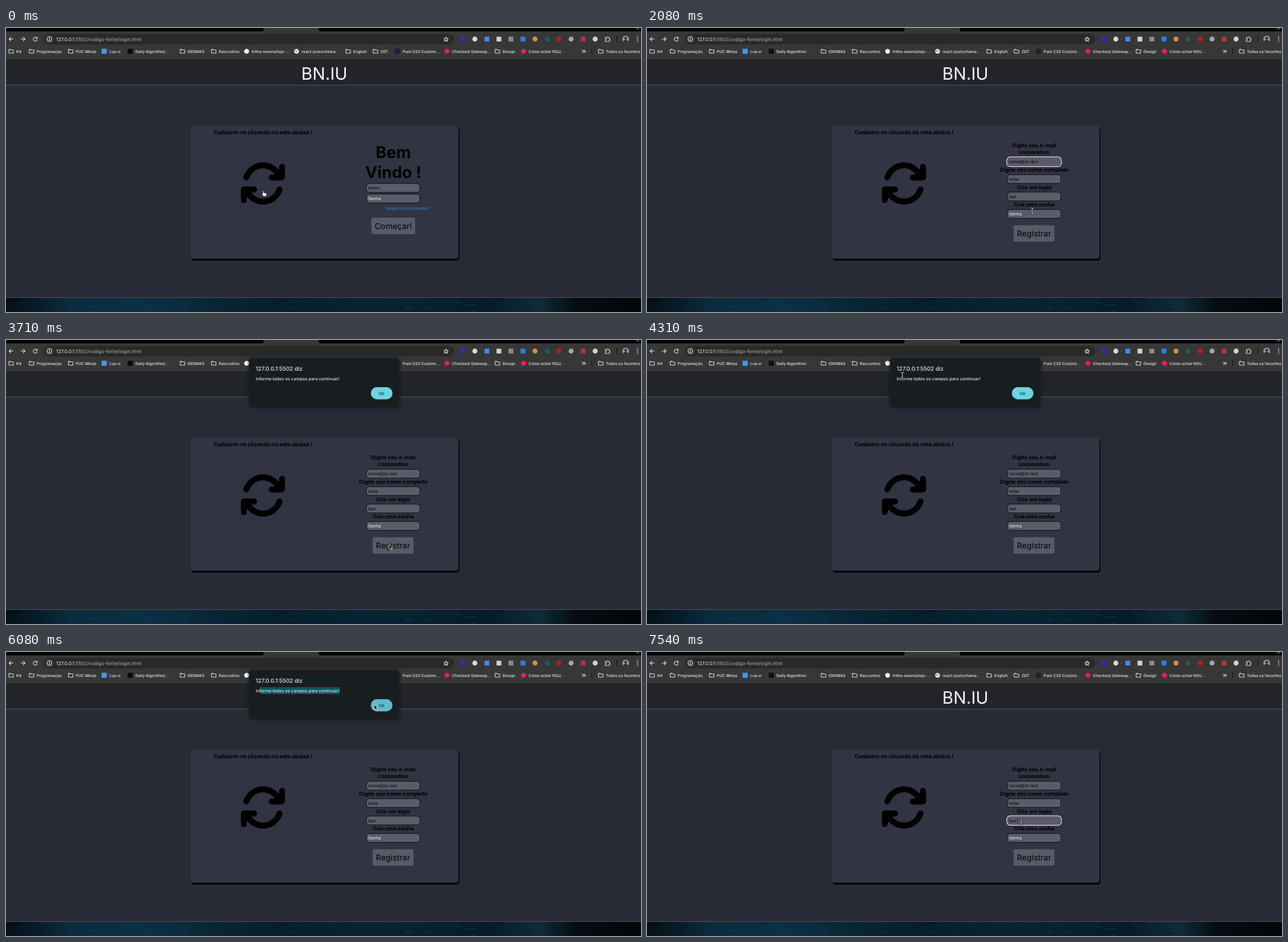
An HTML page for the animation above (7990 ms loop, 1119 by 500 pixels).

```html
<!DOCTYPE html>
<html lang="pt-BR">
<head>
<meta charset="utf-8">
<title>Login</title>
<style>
  html, body { margin: 0; width: 100%; height: 100%; overflow: hidden; background: #282a36; }
  svg { display: block; width: 100vw; height: 100vh; font-family: Inter, Roboto, sans-serif; text-rendering: geometricPrecision; }
  .bold { font-weight: 700; }
  .label { font-weight: 700; font-size: 9.5px; text-anchor: middle; }
  .mid { text-anchor: middle; }
  .line { fill: none; stroke: #e8e8e8; stroke-width: 1.1; stroke-linecap: round; stroke-linejoin: round; }
  .bookmark { font-size: 6.9px; font-weight: 500; fill: #ececec; }
  .value { font-size: 7.6px; }
</style>
</head>
<body>
<svg id="stage" viewBox="0 0 1119 500" preserveAspectRatio="none">
  <defs>
    <linearGradient id="sea">
      <stop offset="0" stop-color="#050f16"/>
      <stop offset=".1" stop-color="#0a2b3e"/>
      <stop offset=".22" stop-color="#0b2f44"/>
      <stop offset=".42" stop-color="#071e2c"/>
      <stop offset=".6" stop-color="#082434"/>
      <stop offset=".76" stop-color="#071c29"/>
      <stop offset=".84" stop-color="#102a37"/>
      <stop offset=".9" stop-color="#050c11"/>
      <stop offset="1" stop-color="#030609"/>
    </linearGradient>
    <filter id="soft" x="-10%" y="-20%" width="120%" height="150%"><feGaussianBlur stdDeviation="2.5"/></filter>
    <filter id="edge" x="-5%" y="-5%" width="110%" height="110%"><feGaussianBlur stdDeviation=".5"/></filter>
    <path id="folder" class="line" d="M-4-2.6q0-.8.8-.8h2l1 1.1h3.5q.8 0 .8.8v4q0 .8-.8.8h-6.5q-.8 0-.8-.8z"/>
    <path id="turn" d="M-181-64A192 192 0 0 1 136-136L190-80M208-176V-64H96" fill="none" stroke="#000" stroke-width="64" stroke-linecap="round" stroke-linejoin="round"/>
    <path id="bar" d="M-2-5Q0-5 0-3.8Q0-5 2-5M0-3.8V3.8M-2 5Q0 5 0 3.8Q0 5 2 5"/>
  </defs>

  <rect width="1119" height="500" fill="#282a36"/>
  <rect width="1119" height="54" fill="#363736"/>
  <path d="M0 0H454V3Q454 6 450 6H0zM551 0H1119V6H555Q551 6 551 3z" fill="#000"/>
  <circle cx="1113" cy="0" r="2.5" fill="#555"/>
  <rect x="67" y="10.5" width="723" height="18.5" rx="9.2" fill="#282928"/>
  <g id="browser"></g>

  <rect y="53" width="1119" height="1" fill="#4a4b4e"/>
  <rect y="54" width="1119" height="46" fill="#222428"/>
  <rect y="100" width="1119" height="1" fill="#515a70"/>
  <text class="mid" x="561" y="91" font-size="30" fill="#f6f6f8">BN.IU</text>

  <rect x="327" y="174" width="472" height="235.5" rx="5" fill="#000" filter="url(#edge)"/>
  <rect x="325" y="171.5" width="472.5" height="234.7" rx="5" fill="#323443"/>
  <text class="bold" x="366" y="187" font-size="9.5">Cadastre-se clicando na seta abaixo !</text>
  <g transform="translate(452.8 273.7) scale(.162 .166)">
    <use href="#turn"/><use href="#turn" transform="rotate(180)"/>
  </g>

  <g id="login"></g>
  <g id="signup"></g>
  <rect id="focus" x="634.2" width="96" height="16.6" rx="6" fill="none" stroke="#ecc8f2" stroke-width="1.5"/>
  <rect id="caret" width=".8" height="9" fill="#111"/>

  <rect y="474" width="1119" height="1" fill="#50545f"/>
  <rect y="475" width="1119" height="25" fill="url(#sea)"/>
  <g id="waves"></g>

  <g id="alert">
    <rect x="428" y="32" width="266" height="87" rx="7" fill="#000" opacity=".6" filter="url(#soft)"/>
    <rect x="428.5" y="31" width="265" height="86" rx="6" fill="#181d1f" stroke="#2b3032" stroke-width=".6"/>
    <text x="440" y="53.7" font-size="9.9" font-weight="500" fill="#e4e8e9">127.0.0.1:5502 diz</text>
    <rect id="selection" x="447" y="62" height="12" fill="#0b5960"/>
    <text x="440" y="70.8" font-size="7.5" font-weight="500" fill="#e4e8e9">Informe todos os campos para continuar!</text>
    <rect id="ok" x="643" y="83" width="38" height="21.5" rx="10.7"/>
    <text class="mid" x="662" y="96.6" font-size="7.2" font-weight="500" fill="#0c3a42">OK</text>
  </g>

  <g id="pointer">
    <path id="hand" d="M-3.2-3.8c.2-1.3 1.7-1.2 2 0l.6 2.6 3.6.8c1.1.3 1.4 1 1.2 2.1l-.6 3.8h-4.6l-3.2-3.8c-.6-1 .6-1.7 1.5-1l.5.4z" fill="#fff" stroke="#000" stroke-width=".7"/>
    <g id="beam" fill="none" stroke-linecap="round">
      <use href="#bar" stroke="#0c0c0c" stroke-width="2.4"/>
      <use href="#bar" stroke="#f0f0f0"/>
    </g>
    <path id="arrow" d="M0 0V8.2L1.9 6.5 3.1 9.3 4.6 8.6 3.4 5.9H6z" fill="#000" stroke="#fff" stroke-width=".7"/>
  </g>
</svg>
<script>
const $ = id => document.getElementById(id);
const text = (cls, x, y, str, extra = '') => `<text class="${cls}" x="${x}" y="${y}" ${extra}>${str}</text>`;
const disc = (x, y, r, fill) => `<circle cx="${x}" cy="${y}" r="${r}" fill="${fill}"/>`;
const square = (x, y, size, fill) =>
  `<rect x="${x - size / 2}" y="${y - size / 2}" width="${size}" height="${size}" rx="1.2" fill="${fill}"/>`;
const line = (x, y, d) => `<path class="line" transform="translate(${x} ${y})" d="${d}"/>`;
const field = (y, value, fill = '#050508') =>
  `<rect x="635" y="${y - 7.8}" width="94.5" height="15.6" rx="5.5" fill="#5a5c6a" stroke="#08080c"/>` +
  text('value', 638, y + 2.8, value, `fill="${fill}"`);
const button = (x, y, w, label) =>
  `<rect x="${x}" y="${y}" width="${w}" height="29" rx="2.5" fill="#585a68"/>` +
  text('mid', x + w / 2, y + 19.6, label, 'font-size="14.3"');

// Bookmarks: text start, label, icon (folder when none is given)
const bookmarks = [
  [18, 'K4'], [54, 'Programação'], [123, 'PUC Minas'], [182, 'Lua.vi', 'square', '#3d9cf5'],
  [228, 'Daily Algorithmi...', 'square', '#0a0d0c'], [320, 'IDIOMAS'], [375, 'Rascunhos'],
  [433, 'trilha-serena/loja-...', 'disc', '#f2f2f2'], [521, 'react-jsonschema...', 'globe'],
  [612, 'English'], [660, 'ZGT'], [699, 'Pure CSS Custom...', 'square', '#2b1840'],
  [786, 'Checkout Gateway...', 'disc', '#f71963'], [875, 'Design'],
  [921, 'Como achar NSU...', 'disc', '#f71963'], [1057, 'Todos os favoritos']
];
const bookmarkIcon = (x, kind, color) => {
  if (kind === 'square') return square(x, 41, 9, color);
  if (kind === 'disc') return disc(x, 41, 4.3, color);
  if (kind === 'globe') return disc(x, 41, 4.3, '#eee') +
    `<path d="M${x - 3} 39.5l2.5 1 1 2.5M${x + 1} 38l2 2" stroke="#333" fill="none"/>`;
  return `<use href="#folder" x="${x}" y="41"/>`;
};

const extensions = [
  ['disc', '#4a1fd0'], ['disc', '#d8d8d8'], ['square', '#4a86e8'], ['square', '#d0d0d0'],
  ['square', '#8a8a8a'], ['square', '#2f7de0'], ['disc', '#d9913f'], ['disc', '#245a60'],
  ['disc', '#c01a1e'], ['disc', '#a5a5a5'], ['square', '#b0343a'], ['disc', '#d0d0d0']
];

$('browser').innerHTML =
  line(9, 19.5, 'M3.5 0H-3.5M-.5-3L-3.5 0L-.5 3') +
  line(30, 19.5, 'M-3.5 0H3.5M.5-3L3.5 0L.5 3') +
  line(51.5, 19.5, 'M3-1.6A3.4 3.4 0 1 0 3.4.8M3.4-3.6V-1.2H1') +
  disc(76.5, 19.5, 7, '#3b3c3b') + line(76.5, 19.5, 'M-4 0A4 4 0 1 1 4 0A4 4 0 1 1-4 0M0-.3V2M0-2V-1.9') +
  text('', 88.5, 22.6, '<tspan fill="#f4f4f4">127.0.0.1</tspan>:5502/codigo-fonte/login.html', 'font-size="8.35" fill="#b0b2b1"') +
  line(775.5, 19.7, 'M0-4L1.2-1.3 4-1.1 1.8.7 2.5 3.6 0 2-2.5 3.6-1.8.7-4-1.1-1.2-1.3z') +
  extensions.map(([kind, color], i) => {
    const x = 805 + i * 21.2;
    return kind === 'disc' ? disc(x, 19.5, 4.4, color) : square(x, 19.5, 8.6, color);
  }).join('') +
  line(1060, 19.8, 'M-3.8-2.7H-1.3A1.3 1.3 0 0 1 1.3-2.7H3.2V-.6A1.3 1.3 0 0 1 3.2 2V4H-3.8V1.6A1.2 1.2 0 0 0-3.8-.8z') +
  '<path d="M1076.5 14V25M1032.5 36V46" stroke="#0c0c0c"/>' +
  disc(1092, 19.5, 6, '#8d949b') + disc(1092, 18, 2.3, '#2b2a2c') +
  '<path d="M1087.5 23.5Q1092 18 1096.5 23.5Q1092 27.5 1087.5 23.5" fill="#2b2a2c"/>' +
  [-3.5, 0, 3.5].map(dy => disc(1113, 19.5 + dy, 1, '#e3e3e3')).join('') +
  line(1018.5, 41, 'M-2.5-2L-.5 0L-2.5 2M.5-2L2.5 0L.5 2') +
  bookmarks.map(([x, label, kind, color]) =>
    bookmarkIcon(x - 9, kind, color) + text('bookmark', x, 43.6, label)).join('');

$('login').innerHTML =
  text('mid bold', 682.5, 229, 'Bem', 'font-size="28.6"') +
  text('mid bold', 682.5, 263.6, 'Vindo !', 'font-size="28.6"') +
  field(281.5, 'admin') + field(300.3, 'Senha', '#f4f4f4') +
  text('', 670, 320.2, 'Esqueci minha senha?', 'font-size="7.1" fill="#338fd6"') +
  button(644, 334, 77, 'Começar!');

$('signup').innerHTML =
  [[210.4, 'Digite seu e-mail'], [222, 'corporativo'], [253, 'Digite seu nome completo'],
   [283.6, 'Crie um login'], [314.2, 'Crie uma senha']]
    .map(([y, label]) => text('label', 682.5, y, label)).join('') +
  field(235.4, 'nome@lar.test') + field(266, 'teste') + field(296.7, 'test') + field(327.3, 'Senha', '#f4f4f4') +
  button(646, 347.3, 72, 'Registrar');

// Seeded ripples, fading into the dark right end
let seed = 7;
const random = () => (seed = seed * 16807 % 2147483647) / 2147483647;
$('waves').innerHTML = Array.from({ length: 320 }, () => {
  const x = random() * 1110, y = 476 + random() * 22, w = 3 + random() * 9;
  const color = random() < .45 ? '#1d536e' : '#02080d';
  const opacity = (.15 + random() * .35) * (x > 970 ? .3 : 1);
  return `<path d="M${x} ${y}q${w / 2} 0 ${w} ${random() * 4 - 1}" fill="none" stroke="${color}" stroke-width="${.5 + random() * .7}" opacity="${opacity}"/>`;
}).join('');

const LOOP = 7990, STEP = 147.8;

// Pointer path: step, x, y, shape from this step on
const path = [
  [0, 455, 291, 'hand'], [1, 456, 290, 'hand'], [2, 510, 275, 'arrow'], [5, 683, 238, 'beam'],
  [7, 680, 242, 'beam'], [14, 679, 322, 'beam'], [17, 679, 322, 'beam'], [18, 678, 340, 'arrow'],
  [19, 676, 352, 'hand'], [20, 675, 358, 'hand'], [23, 675, 361, 'arrow'], [25, 675, 360, 'arrow'],
  [28, 480, 90, 'arrow'], [29, 450, 62, 'beam'], [31, 447, 68, 'beam'], [33, 515, 69, 'beam'],
  [37, 620, 76, 'beam'], [38, 636, 80, 'arrow'], [39, 636, 80, 'arrow'], [41, 649, 93, 'arrow'],
  [42, 652, 110, 'arrow'], [45, 666.5, 328, 'beam'], [47, 661, 296, 'beam'], [51, 659.5, 301, 'beam']
];
// Focus by step: row centre (0 for none) and caret
const focusRows = [
  [0, 0], [7, 235.4, 679], [15, 327.3, 638], [18, 327.3], [23, 0], [42, 327.3], [45, 327.3, 638], [47, 296.7, 653]
];

const latest = (rows, step) => rows.filter(row => row[0] <= step).pop();
const show = (id, on) => $(id).setAttribute('display', on ? 'inline' : 'none');

function pointerAt(step) {
  const a = latest(path, step);
  const b = path[path.indexOf(a) + 1] || a;
  const k = a === b ? 0 : (step - a[0]) / (b[0] - a[0]);
  return { x: a[1] + (b[1] - a[1]) * k, y: a[2] + (b[2] - a[2]) * k, shape: a[3] };
}

function render(time) {
  const step = Math.min(51, Math.floor(time % LOOP / STEP));
  const { x, y, shape } = pointerAt(step);
  $('pointer').setAttribute('transform', `translate(${x} ${y})`);
  for (const id of ['hand', 'beam', 'arrow']) show(id, id === shape);

  show('login', step < 1);
  show('signup', step >= 1);
  show('alert', step >= 23 && step < 42);
  $('selection').setAttribute('width', step > 31 ? Math.max(0, Math.min(x, 588) - 447) : 0);
  $('ok').setAttribute('fill', step >= 40 ? '#62b9c9' : '#6dd3e3');

  const [, row, caretX] = latest(focusRows, step);
  show('focus', row);
  show('caret', caretX);
  if (row) $('focus').setAttribute('y', row - 8.3);
  if (caretX) {
    $('caret').setAttribute('x', caretX);
    $('caret').setAttribute('y', row - 4.5);
  }
}

const start = performance.now();
function tick() {
  render(performance.now() - start);
  requestAnimationFrame(tick);
}
tick();
</script>
</body>
</html>
```
